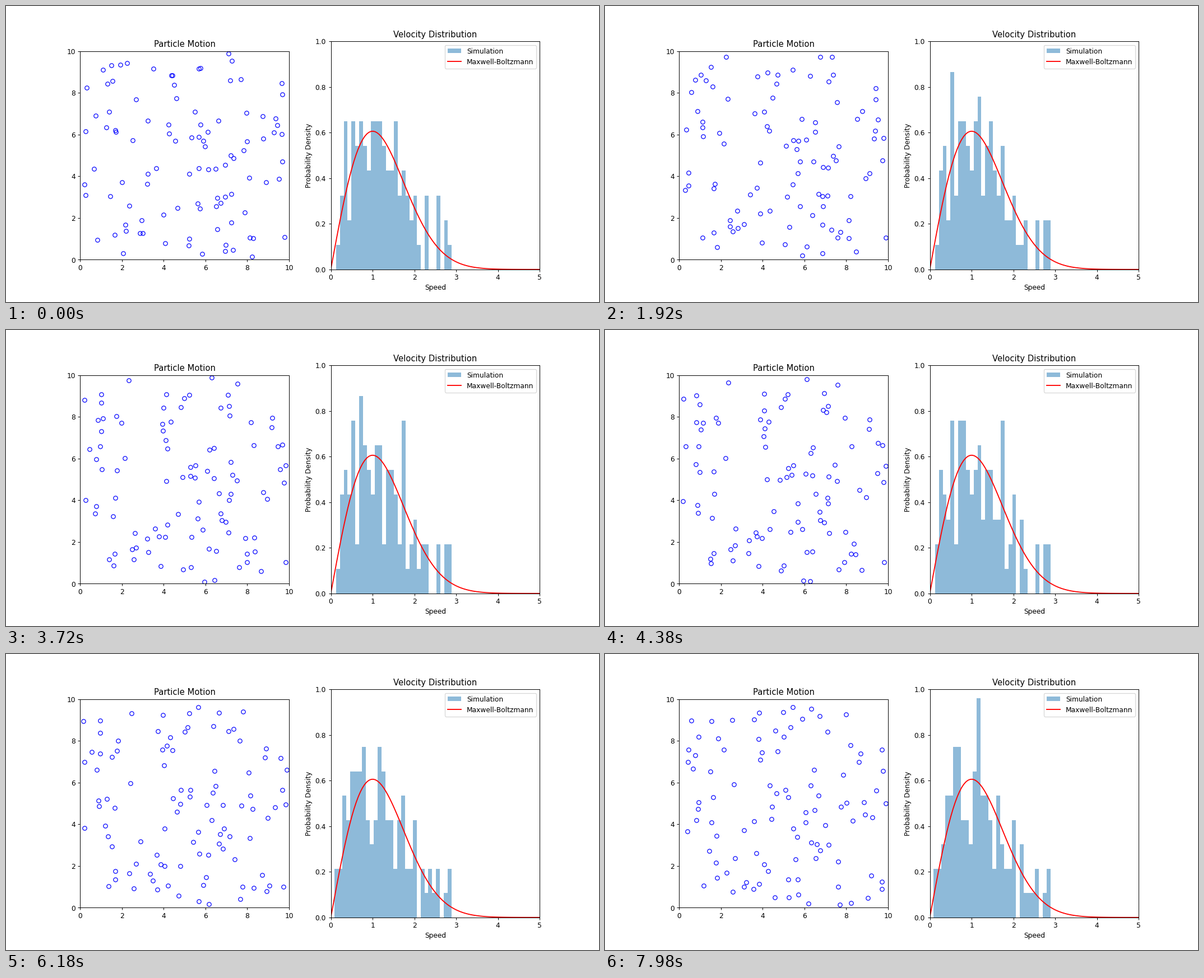
A matplotlib script for the animation above (8000 ms loop, 1058 by 529 pixels).

```python
import numpy as np
import matplotlib.pyplot as plt
from matplotlib.animation import FuncAnimation

COUNT = 100
BOX = 10.0
RADIUS = 0.1
DT = 0.01
BINS = 30
STEP_MS = 60          # one simulation step is shown this long
TICK_MS = 40          # timer interval
LOOP_MS = 8000
WARM_UP = 2           # steps made before the first picture


def bounce(pos, vel):
    """Reflect particles at the walls and keep them inside the box."""
    low, high = RADIUS, BOX - RADIUS
    vel[(pos < low) | (pos > high)] *= -1
    np.clip(pos, low, high, out=pos)


def collide(pos, vel):
    """Elastic collisions of equal masses that overlap and approach."""
    gap = np.linalg.norm(pos[:, None] - pos[None], axis=2)
    for i, j in np.argwhere(np.triu(gap < 2 * RADIUS, 1)):
        normal = (pos[i] - pos[j]) / gap[i, j]
        closing = np.dot(vel[i] - vel[j], normal)
        if closing < 0:
            vel[i] -= closing * normal
            vel[j] += closing * normal


def simulate(steps):
    """Return positions and speeds after each step."""
    np.random.seed(0)
    pos = np.random.uniform(RADIUS, BOX - RADIUS, (COUNT, 2))
    vel = np.random.randn(COUNT, 2)
    states = []
    for _ in range(steps):
        pos += vel * DT
        bounce(pos, vel)
        collide(pos, vel)
        states.append((pos.copy(), np.linalg.norm(vel, axis=1)))
    return states


states = simulate(LOOP_MS // STEP_MS + WARM_UP)[WARM_UP - 1:]

# 12 x 6 inches at this dpi give 1058 x 529 pixels
fig, (box_ax, hist_ax) = plt.subplots(1, 2, figsize=(12, 6), dpi=88.17)

box_ax.set(xlim=(0, BOX), ylim=(0, BOX), aspect="equal",
           title="Particle Motion")
dots, = box_ax.plot(*states[0][0].T, "bo", markersize=6,
                    markerfacecolor="none")

_, _, bars = hist_ax.hist(states[0][1], bins=BINS, density=True, alpha=0.5,
                          label="Simulation")
v = np.linspace(0, 5, 100)
hist_ax.plot(v, v * np.exp(-v**2 / 2), "r-", label="Maxwell-Boltzmann")
hist_ax.set(xlim=(0, 5), ylim=(0, 1), title="Velocity Distribution",
            xlabel="Speed", ylabel="Probability Density")
hist_ax.legend(loc="upper right")


def draw(frame):
    step = (frame * TICK_MS + TICK_MS // 2) // STEP_MS
    pos, speeds = states[step]
    dots.set_data(*pos.T)
    heights, edges = np.histogram(speeds, bins=BINS, density=True)
    for bar, height, left, right in zip(bars, heights, edges, edges[1:]):
        bar.set(x=left, width=right - left, height=height)
    return [dots, *bars]


anim = FuncAnimation(fig, draw, frames=LOOP_MS // TICK_MS, interval=TICK_MS,
                     repeat=True, repeat_delay=0, blit=False)
plt.show()
```
